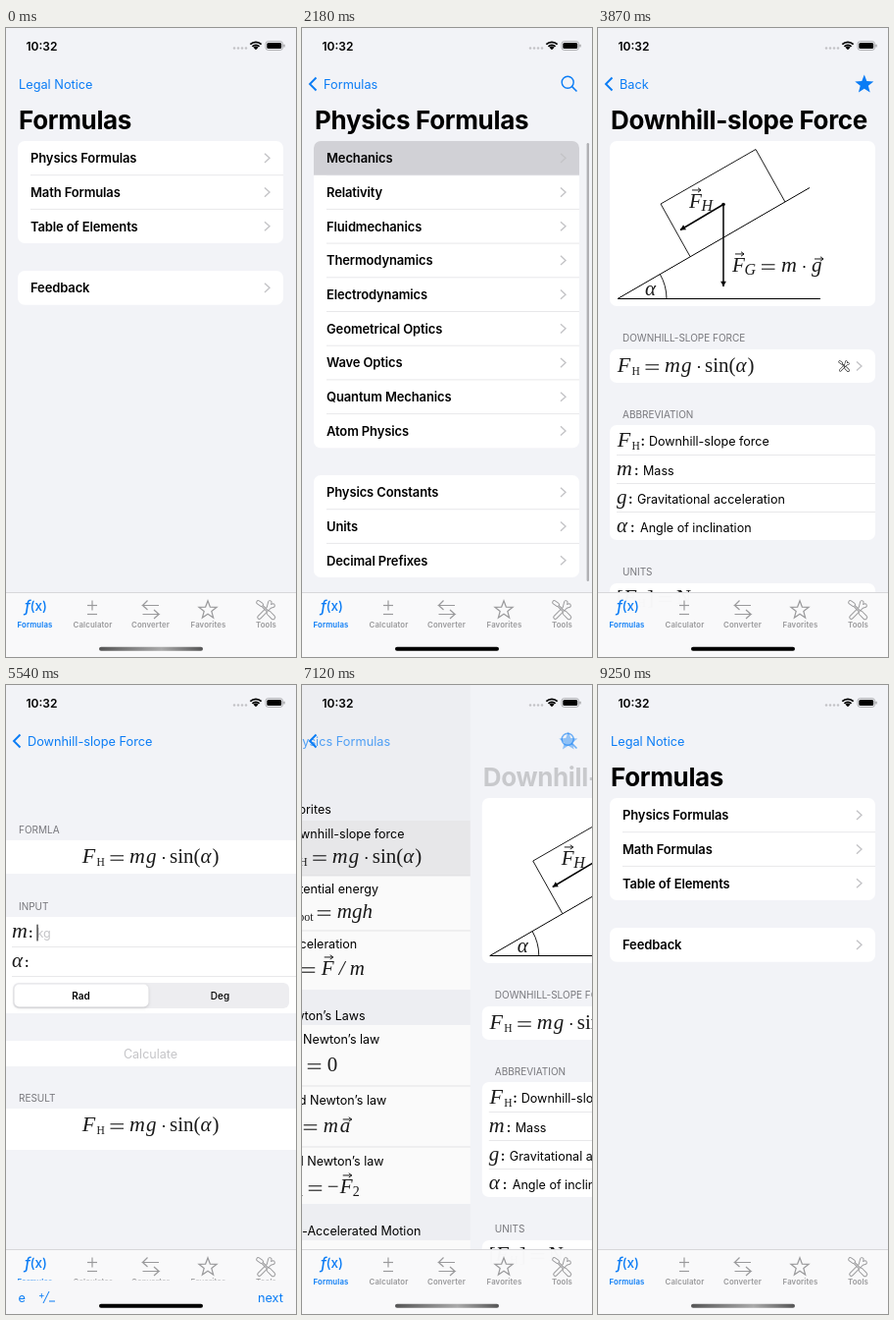
Write an HTML page with a canvas that moves like this. It is 296x640 px and loops after 9.35 s.

```html
<!DOCTYPE html>
<html lang="en">
<head>
<meta charset="utf-8">
<title>Formula app</title>
<style>
html, body { margin: 0; width: 100%; height: 100%; overflow: hidden; background: #f2f2f7; }
canvas { display: block; width: 296px; height: 640px; }
</style>
</head>
<body>
<canvas id="stage"></canvas>
<script>
const W = 296, H = 640, LOOP = 9350;
const BLUE = '#0a7cf5', BG = '#f2f3f7', GREY = '#9a9a9c', LINE = '#dedee1';
const SANS = 'Inter, Roboto, sans-serif', SERIF = '"Liberation Serif", "Noto Serif", serif';
const TITLE = 26, NAV = 12.75;
const canvas = document.getElementById('stage');
const dpr = window.devicePixelRatio || 1;
canvas.width = W * dpr;
canvas.height = H * dpr;
const c = canvas.getContext('2d');

// ---------- basic helpers ----------
const clamp = v => Math.max(0, Math.min(1, v));

function text(s, x, mid, size = 12.55, weight = 400, color = '#000', align = 'left', track = 0) {
  c.font = `${weight} ${size}px ${SANS}`;
  c.letterSpacing = track + 'px';
  c.textAlign = align;
  c.fillStyle = color;
  c.fillText(s, x, mid + size * 0.363);
  c.letterSpacing = '0px';
}

function math(s, x, base, size = 21, style = 'italic') {
  c.font = `${style} ${size}px ${SERIF}`;
  c.textAlign = 'left';
  c.fillStyle = '#1a1a1a';
  c.fillText(s, x, base);
}

const roman = (s, x, base, size = 21) => math(s, x, base, size, 'normal');

function path(points, width = 1, color = '#000', close = false) {
  c.beginPath();
  points.forEach(([x, y], i) => i ? c.lineTo(x, y) : c.moveTo(x, y));
  if (close) c.closePath();
  c.strokeStyle = color;
  c.lineWidth = width;
  c.stroke();
}

function disc(x, y, r, color = '#000') {
  c.beginPath();
  c.arc(x, y, r, 0, 7);
  c.fillStyle = color;
  c.fill();
}

function box(x, y, w, h, r, color) {
  c.beginPath();
  c.roundRect(x, y, w, h, r);
  c.fillStyle = color;
  c.fill();
}

function faded(alpha, draw) {
  if (alpha <= 0) return;
  c.save();
  c.globalAlpha *= clamp(alpha);
  draw();
  c.restore();
}

// ---------- icons ----------
const chevron = y => path([[264, y - 4.6], [269, y], [264, y + 4.6]], 1.4, '#c4c4c7');

function starPath(x, y, r, inner) {
  c.beginPath();
  for (let i = 0; i < 10; i++) {
    const a = i * Math.PI / 5 - Math.PI / 2, d = i % 2 ? inner : r;
    c.lineTo(x + d * Math.cos(a), y + d * Math.sin(a));
  }
  c.closePath();
}

function tools(x, y, s, color, fill) {
  c.save();
  c.translate(x, y);
  c.scale(s, s);
  c.lineCap = c.lineJoin = 'round';
  // Each tool is a wide stroke with a narrower one cut out of it.
  const outlined = strokes => {
    for (const [grow, col] of [[1.8, color], [0, fill]]) {
      strokes.forEach(([pts, w]) => path(pts, w + grow, col));
    }
  };
  outlined([[[[-6, 7], [4, -3]], 2.4], [[[4, -7], [3, -3], [7, -4]], 2.4]]);
  outlined([[[[-7, -7], [-4, -5]], 2.4], [[[-4, -4.5], [3, 2.5]], 0.6], [[[3, 3], [7, 7]], 3]]);
  c.restore();
}

function navIcon(kind) {
  if (kind === 'search') {
    c.beginPath();
    c.arc(271.2, 55.2, 6, 0, 7);
    c.strokeStyle = BLUE;
    c.lineWidth = 1.4;
    c.stroke();
    path([[275.6, 59.6], [280.5, 64.5]], 1.5, BLUE);
  } else if (kind === 'star') {
    starPath(271.8, 57.5, 10, 4.3);
    c.fillStyle = BLUE;
    c.fill();
  }
}

// ---------- formula parts ----------
function equals(x, base, w = 13.5) {
  path([[x, base - 7.2], [x + w, base - 7.2]], 1);
  path([[x, base - 2.8], [x + w, base - 2.8]], 1);
}

function vec(s, x, base, size = 21) {
  math(s, x, base, size);
  const y = base - size * (s === s.toUpperCase() ? 0.86 : 0.62), l = x + 3, r = l + size * 0.43;
  path([[l, y], [r, y]], 0.9);
  path([[r - 3, y - 2.2], [r, y], [r - 3, y + 2.2]], 0.9);
}

function downForce(x, base) {
  math('F', x + 0.8, base, 22);
  roman('H', x + 15.6, base + 3, 11.5);
}

function slopeFormula(x, base) {
  downForce(x, base);
  equals(x + 29.5, base);
  math('m', x + 49, base, 22);
  math('g', x + 66, base);
  disc(x + 84, base - 5, 1.1);
  roman('sin(', x + 90, base);
  math('α', x + 121.5, base);
  roman(')', x + 133.5, base);
}

// ---------- screens ----------
function list(top, labels, lit = 0) {
  const pitch = 34.7, h = pitch * labels.length;
  box(12, top, 271, h, 7, '#fff');
  faded(lit, () => box(12, top, 271, pitch, [7, 7, 0, 0], '#d1d1d6'));
  labels.forEach((label, i) => {
    const y = top + pitch * (i + 0.5);
    text(label, 25, y + 0.2, 13, 600, '#000', 'left', -0.13);
    chevron(y);
    if (i) path([[25, top + pitch * i], [283, top + pitch * i]], 0.7, LINE);
  });
}

function homeScreen(lit) {
  list(115, ['Physics Formulas', 'Math Formulas', 'Table of Elements'], lit);
  list(247, ['Feedback']);
}

function physicsScreen(lit, t) {
  list(115, ['Mechanics', 'Relativity', 'Fluidmechanics', 'Thermodynamics', 'Electrodynamics',
    'Geometrical Optics', 'Wave Optics', 'Quantum Mechanics', 'Atom Physics'], lit);
  list(455, ['Physics Constants', 'Units', 'Decimal Prefixes']);
  const flash = (a, b) => clamp((t - a) / 200) * clamp((b - t) / 200);
  faded(flash(1640, 2550) + flash(8080, 8990), () => box(290.6, 117, 2.4, 446, 1.2, '#b0b0b4'));
}

function mechanicsScreen(lit) {
  text('Favorites', 13, 126);
  box(12, 138, 271, 172, 7, '#fff');
  faded(lit, () => box(12, 138, 271, 56, [7, 7, 0, 0], '#d1d1d6'));
  text('Newton’s Laws', 13, 336);
  box(12, 346, 271, 182, 7, '#fff');
  text('Non-Accelerated Motion', 13, 555);
  box(12, 565, 271, 60, 7, '#fff');
  for (const y of [194, 250, 408, 470]) path([[19, y], [283, y]], 0.7, LINE);
  for (const y of [166, 222, 280, 377, 439, 499]) chevron(y);
  [['Downhill-slope force', 151], ['Potential energy', 207], ['Acceleration', 263],
    ['1st Newton’s law', 360], ['2nd Newton’s law', 422], ['3rd Newton’s law', 484]]
    .forEach(([s, y]) => text(s, 19, y));
  slopeFormula(19, 181);
  math('E', 19, 237, 22);
  roman('pot', 33.5, 240, 12);
  equals(53, 237);
  math('mgh', 73, 237);
  vec('a', 19, 295);
  equals(37, 295);
  vec('F', 57, 295);
  math('/ m', 75, 295);
  math('d', 18, 386, 16);
  vec('v', 26, 386, 16);
  path([[18, 389], [36, 389]], 0.9);
  math('dt', 20, 402, 16);
  equals(43, 393);
  roman('0', 63, 393);
  vec('F', 19, 455);
  equals(39, 455);
  math('m', 59, 455);
  vec('a', 76, 455);
  vec('F', 19, 517);
  roman('1', 32, 520, 14);
  equals(44, 517);
  roman('−', 63, 517);
  vec('F', 76, 517);
  roman('2', 89, 520, 14);
}

function arrow(x0, y0, x1, y1) {
  const a = Math.atan2(y1 - y0, x1 - x0);
  path([[x0, y0], [x1, y1]], 1.5);
  const wing = d => [x1 - 6 * Math.cos(a + d), y1 - 6 * Math.sin(a + d)];
  c.beginPath();
  for (const p of [[x1, y1], wing(0.5), wing(-0.5)]) c.lineTo(...p);
  c.fillStyle = '#000';
  c.fill();
}

function header(s, x, y) {
  text(s, x, y, 10, 400, '#77777c');
}

function slopeScreen(lit) {
  box(12, 115, 271, 168, 7, '#fff');
  path([[227, 275.5], [20, 275.5], [216, 162.5]], 1);
  path([[94, 232.5], [64, 179], [161, 123.5], [191, 177]], 0.9);
  c.beginPath();
  c.arc(20, 275.5, 50, -Math.PI / 6, 0);
  c.strokeStyle = '#000';
  c.stroke();
  arrow(128, 179.5, 84, 205.5);
  arrow(128, 179.5, 128, 263);
  disc(128, 179.5, 1.8);
  vec('F', 93, 183);
  math('H', 105.5, 186, 16);
  math('α', 48, 272);
  vec('F', 137, 248);
  math('G', 149.5, 251, 16);
  equals(167, 248);
  math('m', 187, 248, 22);
  disc(210.5, 243, 1.1);
  vec('g', 218, 248);

  header('DOWNHILL-SLOPE FORCE', 25, 315);
  box(12, 327, 271, 34, 7, '#fff');
  faded(lit, () => box(12, 327, 271, 34, 7, '#d1d1d6'));
  slopeFormula(19, 350);
  tools(251, 344, 0.62, '#222', '#fff');
  chevron(344);

  header('ABBREVIATION', 25, 393);
  box(12, 404, 271, 117, 7, '#fff');
  for (const y of [434.5, 463.5, 492.5]) path([[19, y], [283, y]], 0.7, LINE);
  downForce(19, 426);
  math('m', 19, 455, 22);
  math('g', 19, 484);
  math('α', 19, 513);
  [['Downhill-slope force', 52, 420, 43.5], ['Mass', 46, 450, 37],
    ['Gravitational acceleration', 40, 479, 31], ['Angle of inclination', 43, 508, 33]]
    .forEach(([s, x, y, colon]) => {
      text(s, x, y);
      text(':', colon, y, 14, 600);
    });
  header('UNITS', 25, 553);
  box(12, 565, 271, 60, 7, '#fff');
  roman('[', 19, 586);
  downForce(25, 586);
  roman(']', 50, 586);
  equals(62, 586);
  roman('N', 80, 586);
}

function inputScreen(lit, t) {
  const strip = (y, h) => box(0, y, W, h, 0, '#fff');
  header('FORMLA', 13, 147);
  strip(158, 34);
  slopeFormula(77, 181);
  header('INPUT', 13, 225);
  strip(236, 98);
  path([[6, 266.5], [W, 266.5]], 0.7, LINE);
  path([[6, 296.5], [W, 296.5]], 0.7, LINE);
  math('m', 6, 257, 22);
  text(':', 23, 252, 14, 600);
  text('kg', 31.5, 252, 12.55, 400, '#c5c5c8');
  if (t >= 5540 && t < 6040 || t >= 4870 && t < 5220) box(31.4, 243.5, 1.3, 17, 0.6, '#333');
  math('α', 6, 287);
  text(':', 19, 282, 14, 600);
  box(7, 303, 282, 26, 6, '#ededf0');
  c.save();
  c.shadowColor = 'rgba(0,0,0,.18)';
  c.shadowBlur = 3 * dpr;
  c.shadowOffsetY = dpr;
  box(8.5, 304.5, 137, 23, 5, '#fff');
  c.restore();
  text('Rad', 76.5, 316, 10, 600, '#000', 'center');
  text('Deg', 218.5, 316, 10, 500, '#000', 'center');
  strip(362, 26);
  text('Calculate', 147.5, 375, 12.55, 400, '#c5c5c8', 'center');
  header('RESULT', 13, 420);
  strip(431, 42);
  slopeFormula(77, 454);
}

const screens = {
  home: { draw: homeScreen, title: 'Formulas', left: 'Legal Notice' },
  physics: { draw: physicsScreen, title: 'Physics Formulas', back: 'Formulas', icon: 'search' },
  mechanics: { draw: mechanicsScreen, title: 'Mechanics', back: 'Physics Formulas', icon: 'search' },
  slope: { draw: slopeScreen, title: 'Downhill-slope Force', back: 'Back', icon: 'star' },
  input: { draw: inputScreen, title: '', back: 'Downhill-slope Force' }
};

// [first step, last step, number of steps, lower screen, upper screen, pushing]
const moves = [
  [1200, 2070, 9, 'home', 'physics', true],
  [2180, 2630, 5, 'physics', 'mechanics', true],
  [3310, 4210, 9, 'mechanics', 'slope', true],
  [4320, 5220, 9, 'slope', 'input', true],
  [6040, 6910, 9, 'slope', 'input', false],
  [7020, 7350, 4, 'mechanics', 'slope', false],
  [7650, 8520, 9, 'physics', 'mechanics', false],
  [8630, 9080, 5, 'home', 'physics', false]
];

function coverage(t, [start, end, count, , , pushing]) {
  const step = (end - start) / (count - 1);
  const k = Math.floor((t - start) / step + 0.15);
  let p = 1;
  if (k < count - 1) {
    const u = 13 * Math.max(0, (k * step + (pushing ? -40 : 40)) / 1000);
    p = 1 - (1 + u) * Math.exp(-u);
    if (p > 0.985) p = 1;
  }
  return pushing ? p : 1 - p;
}

// ---------- bars ----------
function bigTitle(s, x, mid, size) {
  text(s, x, mid, size, 700, '#000', 'left', -0.0135 * size);
}

function navBar(low, up, p) {
  const mix = (a, b) => a + (b - a) * p;
  const slide = -0.3 * W * p;
  const x = mix(13, 22), y = mix(93.3, 57), size = mix(TITLE, NAV);
  faded(1 - p * 2.6, () => bigTitle(low.title, x, y, size));
  faded(p * 2 - 1, () => text(up.back, x, y, size, 400, BLUE));
  faded((p - 0.3) / 0.7, () => bigTitle(up.title, 13 + W * (1 - p), 93.3, TITLE));
  faded((1 - p) * 1.2, () => text(low.left || low.back, (low.left ? 13 : 22) + slide, 57, NAV, 400, BLUE));
  faded(low.back ? 1 : p, () => path([[14.5, 50.5], [8, 57], [14.5, 63.5]], 1.9, BLUE));
  if (low.icon === up.icon) navIcon(low.icon);
  else {
    faded(1 - p, () => navIcon(low.icon));
    faded(p, () => navIcon(up.icon));
  }
}

function statusBar() {
  text('10:32', 36.5, 18.3, 12, 600, '#000', 'center');
  for (let i = 0; i < 4; i++) disc(233 + i * 4, 20.5, 1.2, '#c2c2c6');
  for (const r of [2, 5, 8]) {
    c.beginPath();
    c.arc(255, 22.3, r, -Math.PI * 0.75, -Math.PI * 0.25);
    c.strokeStyle = '#000';
    c.lineWidth = r === 2 ? 3 : 1.8;
    c.stroke();
  }
  c.beginPath();
  c.roundRect(265, 13.6, 17.5, 8.8, 2.6);
  c.strokeStyle = '#9b9b9f';
  c.lineWidth = 0.8;
  c.stroke();
  box(266.3, 14.9, 14.9, 6.2, 1.5, '#000');
  box(283.4, 16.6, 1.2, 3, 0.6, '#9b9b9f');
}

function tabBar() {
  box(0, 574, W, 66, 0, 'rgba(249,249,250,.985)');
  path([[0, 574.5], [W, 574.5]], 0.8, '#cfcfd2');
  ['Formulas', 'Calculator', 'Converter', 'Favorites', 'Tools'].forEach((s, i) =>
    text(s, 29.5 + i * 59, 607.3, 7.8, 600, i ? GREY : BLUE, 'center', 0.12));
  text('f', 19, 588, 15.5, 'italic 500', BLUE);
  text('(x)', 24.5, 588, 13.5, 500, BLUE);
  path([[83, 587.5], [93, 587.5]], 1.2, GREY);
  path([[88, 582.5], [88, 592.5]], 1.2, GREY);
  path([[83, 596.5], [93, 596.5]], 1.2, GREY);
  path([[156, 587.5], [139.5, 587.5], [144.5, 582.5]], 1.2, GREY);
  path([[139.5, 587.5], [144.5, 592]], 1.2, GREY);
  path([[139.5, 596.5], [156, 596.5], [151, 592]], 1.2, GREY);
  path([[156, 596.5], [151, 601]], 1.2, GREY);
  starPath(206, 592.3, 9.6, 4);
  c.strokeStyle = GREY;
  c.lineWidth = 1.2;
  c.stroke();
  tools(265, 592, 1.08, GREY, '#f9f9fa');
}

function inputBar(p) {
  if (!p) return;
  const y = 605.5 + 36 * (1 - p), mid = y + 17.5;
  box(0, y, W, 36, 0, '#f7f7f9');
  text('e', 12.5, mid, NAV, 400, BLUE);
  text('+', 33, mid - 3, 10, 400, BLUE);
  path([[38, mid + 6], [44, mid - 6]], 1, BLUE);
  path([[44, mid + 4], [50, mid + 4]], 1, BLUE);
  text('next', 283, mid, NAV, 400, BLUE, 'right');
}

function homeIndicator(t) {
  let color = '#000';
  if (t < 1310 || t >= 6790) {
    color = c.createLinearGradient(95, 0, 201, 0);
    [[0, '#555'], [0.6, '#aaa'], [1, '#555']].forEach(stop => color.addColorStop(...stop));
  }
  box(95, 629.7, 106, 4, 2, color);
}

// ---------- frame ----------
function render(t) {
  c.setTransform(dpr, 0, 0, dpr, 0, 0);
  c.lineCap = 'butt';
  c.lineJoin = 'miter';
  const move = moves.filter(m => t >= m[0]).pop();
  const cover = move ? coverage(t, move) : 0;
  const low = screens[move ? move[3] : 'home'];
  const up = screens[move ? move[4] : 'physics'];
  const lit = !move ? 0 : move[5] ? 1 : cover;

  box(0, 0, W, H, 0, BG);
  if (cover < 1) {
    c.save();
    c.translate(-0.3 * W * cover, 0);
    low.draw(lit, t);
    c.restore();
    if (cover) box(0, 0, W, H, 0, `rgba(0,0,0,${0.05 * cover})`);
  }
  if (cover > 0) {
    c.save();
    c.translate(W * (1 - cover), 0);
    box(0, 0, W, H, 0, BG);
    up.draw(0, t);
    c.restore();
  }
  navBar(low, up, cover);
  statusBar();
  tabBar();
  if (up === screens.input) inputBar(cover);
  homeIndicator(t);
}

const origin = performance.now();
function tick() {
  render((performance.now() - origin) % LOOP);
  requestAnimationFrame(tick);
}
tick();
</script>
</body>
</html>
```
